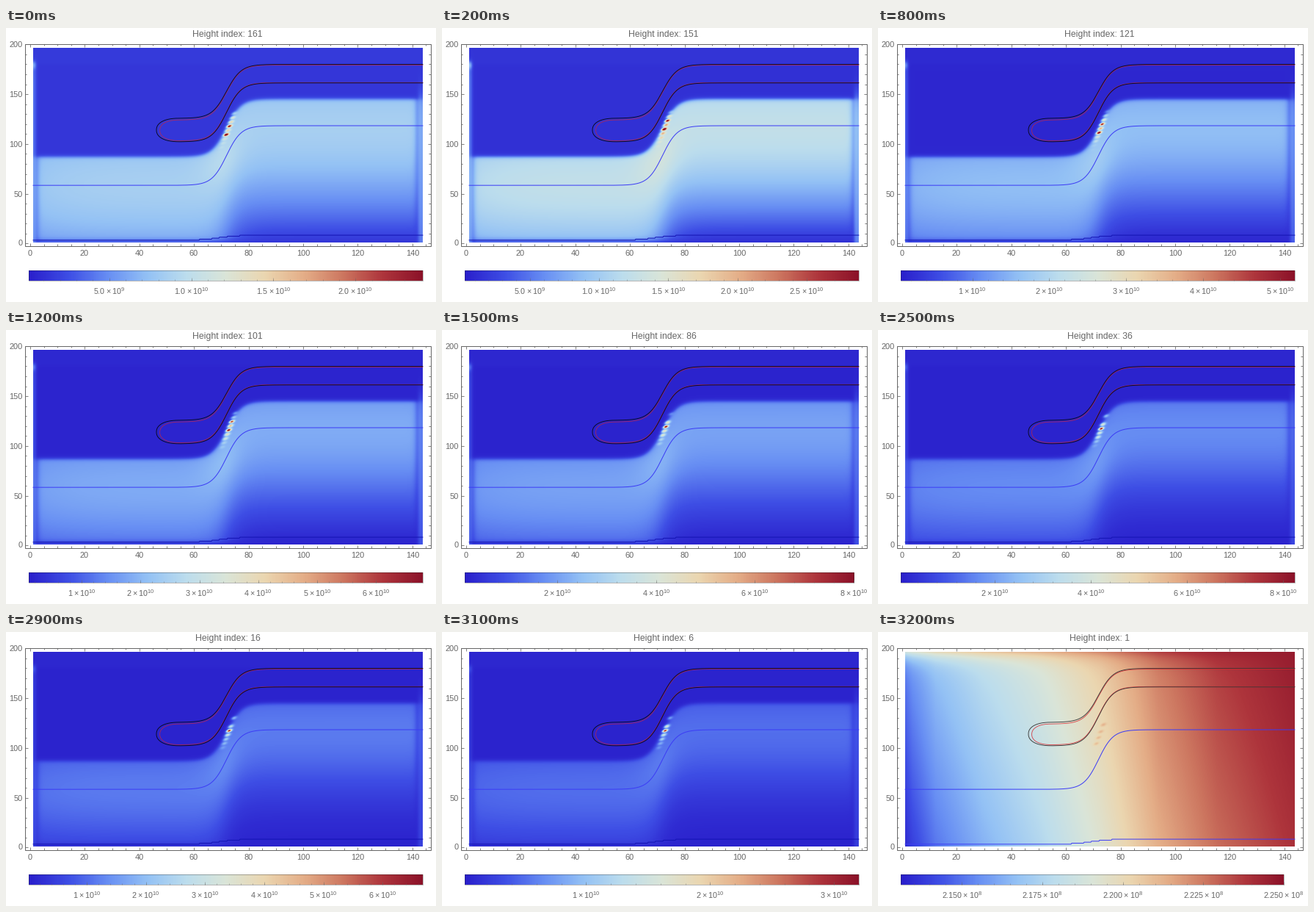
A matplotlib script that plays this animation: 586 px wide and 373 px high, repeating every 3300 ms.

```python
import numpy as np
import matplotlib.pyplot as plt
from matplotlib.animation import FuncAnimation
from matplotlib.collections import LineCollection
from matplotlib.colors import LinearSegmentedColormap
from matplotlib.patches import Rectangle

W, H, DPI = 586, 373, 100
PX = 72 / DPI
FRAMES, INTERVAL = 33, 100
GREY = "#666666"

plt.rcParams.update({
    "font.family": "Liberation Sans",
    "mathtext.fontset": "custom",
    "mathtext.rm": "Liberation Sans",
    "mathtext.default": "rm",
})

THERMO = LinearSegmentedColormap.from_list("thermo", np.array([
    (42, 31, 203), (62, 78, 229), (103, 142, 243), (147, 193, 245),
    (188, 221, 237), (218, 229, 216), (235, 214, 176), (228, 173, 135),
    (204, 117, 95), (174, 53, 60), (140, 18, 41)]) / 255, N=512)

# Plot geometry in pixels
LEFT, RIGHT, TOP, BOTTOM = 25.5, 578.5, 21.5, 296.5
IMG = (37, 568, 292, 27)
BAR_X, BAR_END, BAR_TOP, BAR_BOTTOM = 31, 568, 330, 344
MID = 300.5


def px(x):
    return 32.5 + 3.72 * x


def py(y):
    return 292.9 - 1.355 * y


def sig(t):
    return 1 / (1 + np.exp(-np.clip(t, -50, 50)))


def step(p, mid=MID, width=20):
    return 0.5 * (1 + np.tanh((p - mid) / width))


# Values by height index, in units of 1e10
KEYS = [1, 6, 11, 16, 38, 61, 86, 121, 151, 161]
VMAX = [0.0225, 3.2, 5.3, 6.68, 8.4, 8.9, 8.005, 5.19, 2.877, 2.41]
VMIN = [0.02131, 0.02, 0.02, 0.02, 0.05, 0.08, 0.12, 0.07, 0.028, 0.01]
BODY = [0, 0.45, 0.8, 1.08, 1.6, 1.96, 1.84, 1.45, 1.1, 0.72]
HOT = [117, 117, 117, 117, 117, 117, 119, 111, 114.5, 109]

cols, rows = np.meshgrid(np.arange(IMG[0], IMG[1]) + 0.5,
                         np.arange(IMG[3], IMG[2]) + 0.5)
X = (cols - 32.5) / 3.72
Y = (292.9 - rows) / 1.355
RISE = step(cols)
DEPTH = 86.6 + 58 * RISE - Y
SLOPE = 7.9 * RISE * (1 - RISE)
NORMAL = DEPTH / np.sqrt(1 + SLOPE ** 2)
SIDES = sig((X - 2.8) / 0.6) * sig((141.6 - X) / 0.6)
RIM = sig((Y - 3.2) / 1.3)


def bead(y, amp, wide=1.0, tall=1.6):
    x = 73 + 0.135 * (y - 117)
    lean = Y - y - 0.8 * (X - x)
    return amp * np.exp(-((X - x) / wide) ** 2 - (lean / tall) ** 2)


def start_field():
    u = (X - 1) / 143
    v = np.interp(u, [0, .02, .08, .2, .35, .5, .65, .8, 1],
                  [.1, .15, .24, .34, .44, .57, .74, .85, .94])
    v = v + (0.16 - 0.1 * u) * (Y / 196 - 0.5)
    v += 0.28 * (1 - u) * np.exp((Y - 196) / 8)
    return v + sum(bead(y, 0.09) for y in (104, 110, 116, 123))


def field(index):
    if index == 1:
        return start_field()
    vmax = np.interp(index, KEYS, VMAX)
    level = np.interp(index, KEYS, BODY) / vmax
    spread = 62 + 30 * index / 161
    v = sig(NORMAL / 1.1) * np.exp(-((DEPTH - 28) / spread) ** 2)
    v *= 1 - 0.95 * sig((X - 78) / 3.5) * np.exp(
        -(np.maximum(Y, 0) / 17) ** 1.3)
    v *= (0.25 + 0.75 * SIDES) * (0.25 + 0.75 * RIM)
    v *= 1 - 0.12 * np.exp(-X / 12)
    v *= 1 + 0.14 * np.exp(-((X - 70) / 9) ** 2 - ((Y - 85) / 30) ** 2)
    v *= level
    # Side strips and the slightly lighter top band
    v += 0.35 * level * sig((2.2 - X) / 0.3) * sig((178 - Y) / 3)
    v += 0.4 * level * sig((X - 142.3) / 0.3) * sig((150 - Y) / 6)
    v += 0.5 * level * np.exp(-((X - 1.4) / 0.9) ** 2 - ((Y - 179) / 4) ** 2)
    v += 0.008 * sig(Y - 180) + 0.01 + 0.042 * (index / 161) ** 6
    # Beads along the steep face
    rng = np.random.default_rng(index)
    hot = np.interp(index, KEYS, HOT)
    spots = bead(hot, 0.85, 0.9, 1.3)
    if index > 100:
        spots += bead(hot + 8.5, 0.75, 0.9, 1.3)
    for y in np.arange(hot - 17, 134, 4.25):
        amp = 0.5 * np.exp(-((y - 118) / 13) ** 2) * rng.uniform(0.6, 1)
        if min(abs(y - hot), abs(y - hot - 8.5)) > 1:
            spots = np.maximum(spots, bead(y, amp))
    return np.clip(v + spots, 0, 1)


def outline(inset):
    """Rounded plate outline, in pixels, open at its right end."""
    xs = np.linspace(IMG[1], 238, 400)
    k = inset * (0.4 + 0.6 * sig((300 - xs) / 12))
    top = 123 - 73.5 * step(xs) + k
    low = 155 - 80.2 * step(xs) - 0.6 * k
    mid, half = (top[-1] + low[-1]) / 2, (low[-1] - top[-1]) / 2
    a = np.linspace(np.pi / 2, 3 * np.pi / 2, 120)
    cap_x = 238 - (33 - 2 * inset) * np.abs(np.cos(a)) ** 0.8
    cap_y = mid - half * np.sign(np.sin(a)) * np.abs(np.sin(a)) ** 0.9
    return np.r_[xs, cap_x, xs[::-1]], np.r_[top, cap_y, low[::-1]]


fig = plt.figure(figsize=(W / DPI, H / DPI), dpi=DPI, facecolor="white")
ax = fig.add_axes([0, 0, 1, 1])
ax.axis("off")

image = ax.imshow(np.zeros(X.shape), cmap=THERMO, vmin=0, vmax=1,
                  extent=IMG, interpolation="nearest", aspect="auto")
bar = ax.imshow(np.linspace(0, 1, 540)[None, :], cmap=THERMO, vmin=0, vmax=1,
                extent=(BAR_X, BAR_END, BAR_BOTTOM, BAR_TOP),
                interpolation="nearest", aspect="auto")
ax.set(xlim=(0, W), ylim=(H, 0))


def label(x, y, text, size=11, ha="center"):
    return ax.text(x, y, text, fontsize=size * PX, color=GREY, ha=ha,
                   va="baseline")


def draw_frame():
    segs = []
    for x in range(0, 146, 5):
        n = 4 if x % 20 == 0 else 2.5
        p = np.floor(px(x)) + 0.5
        segs += [[(p, BOTTOM), (p, BOTTOM - n)], [(p, TOP), (p, TOP + n)]]
        if n == 4:
            label(p + 0.5, 310, str(x))
    for y in range(0, 201, 10):
        n = 4 if y % 50 == 0 else 2.5
        q = np.floor(py(y)) + 0.5
        segs += [[(LEFT, q), (LEFT + n, q)], [(RIGHT, q), (RIGHT - n, q)]]
        if n == 4:
            label(22.5, q + 4, str(y), ha="right")
    ax.add_collection(LineCollection(segs, colors=GREY, linewidths=0.8 * PX))
    ax.add_patch(Rectangle((LEFT, TOP), RIGHT - LEFT, BOTTOM - TOP,
                           fill=False, ec=GREY, lw=PX))


draw_frame()
wave = np.linspace(IMG[0], IMG[1], 532)
blue = dict(color="#3c3cf5", lw=PX)
upper, = ax.plot(wave, 214.2 - 81.2 * step(wave), **blue)
lower, = ax.plot(wave, py(np.round(3 + 5 * step(wave, 291, 25))), **blue)
red, = ax.plot(*outline(2.3), color="#d8262e", lw=0.8 * PX)
black, = ax.plot(*outline(0), color="black", lw=0.9 * PX)

title = label(302, 12, "", 12.3)
bar_box = ax.add_patch(Rectangle((BAR_X, BAR_TOP), 1, BAR_BOTTOM - BAR_TOP,
                                 fill=False, ec="#202020", lw=0.8 * PX,
                                 alpha=0.4))
bar_ticks = ax.add_collection(LineCollection([], colors=GREY, alpha=0.55,
                                             linewidths=0.7 * PX))
bar_labels = [label(0, 363, "", 10.7) for _ in range(8)]


def tick_rule(vmax):
    """Step, decimals and half label width for the colour scale."""
    if vmax < 0.1:
        return 0.00025, 3, 26
    if vmax < 3:
        return 0.5, 1, 22
    return (1, 0, 18) if vmax < 7 else (2, 0, 18)


def sci(value, digits):
    power = int(np.floor(np.log10(value) + 1e-9))
    return rf"${value / 10 ** power:.{digits}f}\times10^{{{power + 10}}}$"


def draw_scale(index):
    lo, hi = np.interp(index, KEYS, VMIN), np.interp(index, KEYS, VMAX)
    gap, digits, half = tick_rule(hi)
    ticks = gap * np.arange(np.ceil(lo / gap), np.floor(hi / gap + 1e-6) + 1)
    ticks = ticks[ticks > 0]
    last = (ticks[-1] - lo) / (hi - lo)
    end = min(BAR_END, BAR_X + (579 - half - BAR_X) / last)

    def pos(v):
        return BAR_X + (v - lo) / (hi - lo) * (end - BAR_X)

    bar.set_extent((BAR_X, end, BAR_BOTTOM, BAR_TOP))
    ax.set(xlim=(0, W), ylim=(H, 0))
    bar_box.set_width(end - BAR_X)
    fine = gap / 5
    minor = fine * np.arange(np.ceil(lo / fine), np.floor(hi / fine) + 1)
    bar_ticks.set_segments(
        [[(pos(v), BAR_BOTTOM), (pos(v), BAR_BOTTOM - 2)] for v in minor]
        + [[(pos(v), BAR_BOTTOM), (pos(v), BAR_BOTTOM - 4)] for v in ticks])
    for i, text in enumerate(bar_labels):
        shown = i < len(ticks)
        text.set_visible(shown)
        if shown:
            text.set_x(pos(ticks[i]))
            text.set_text(sci(ticks[i], digits))


def update(frame):
    index = 161 - 5 * frame
    first = index == 1
    title.set_text(f"Height index: {index}")
    image.set_data(field(index))
    draw_scale(index)
    red.set_alpha(0.9 if first else 0.75)
    black.set_color("#383838" if first else "#08081c")
    lower.set_color("#3c3cf5" if first else "#1414b4")
    return []


anim = FuncAnimation(fig, update, frames=FRAMES, interval=INTERVAL,
                     repeat=True, repeat_delay=0, blit=False)
plt.show()
```
